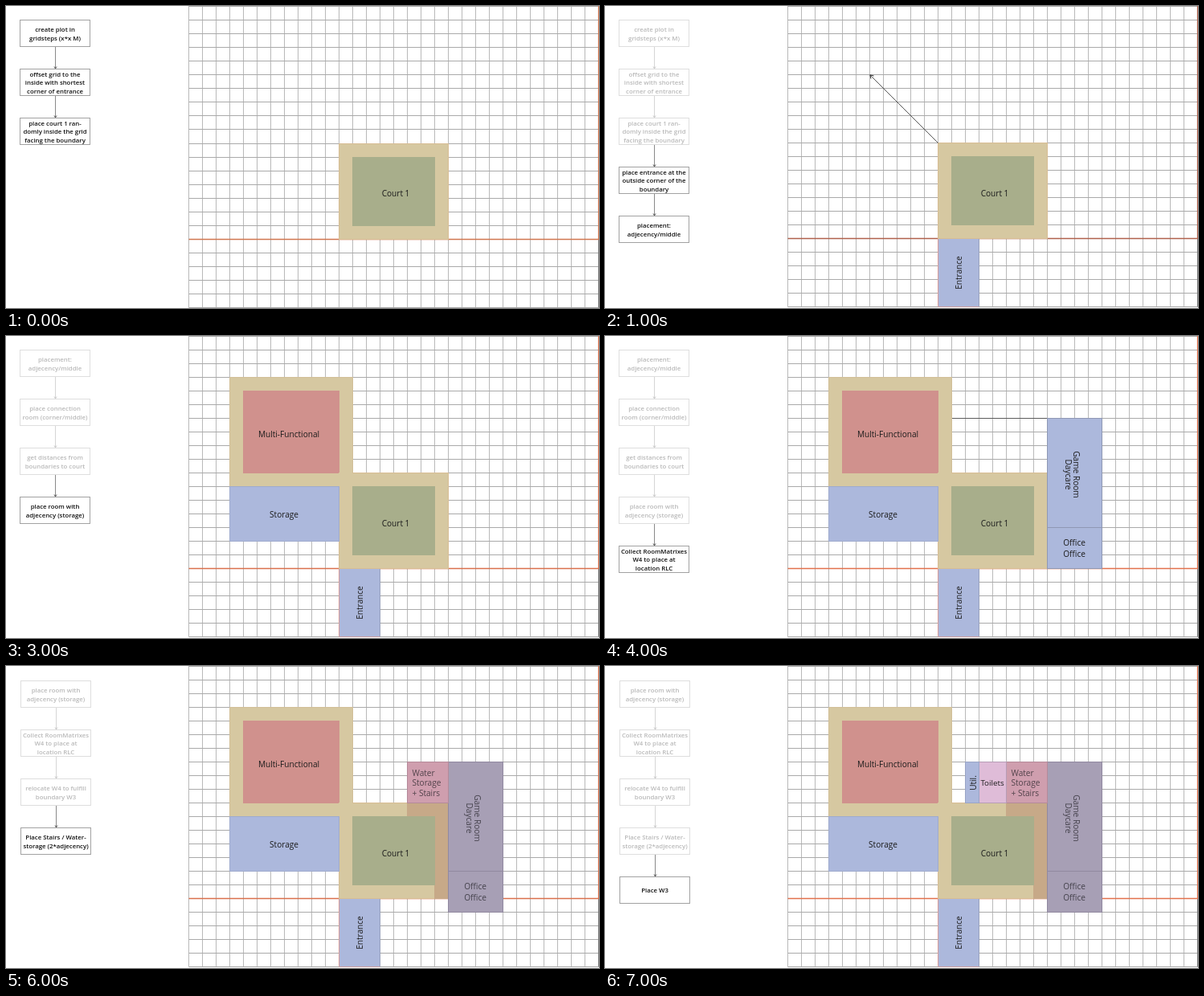
An HTML page for the animation above (8 s loop, 738 by 376 pixels).

```html
<!DOCTYPE html>
<html lang="en">
<head>
<meta charset="utf-8">
<title>Plan layout steps</title>
<style>
html, body { margin: 0; width: 100%; height: 100%; overflow: hidden; background: #fff; }
svg { display: block; font-family: "Open Sans", "Noto Sans", sans-serif; }
text { text-anchor: middle; }
</style>
</head>
<body>
<svg id="stage" width="738" height="376" viewBox="0 0 738 376"></svg>
<script>
const stage = document.getElementById('stage');
const STEP = 1000, COUNT = 8;
const TAN = '#d6c8a1', GREEN = '#a8ae8b', RED = '#d0918d', BLUE = '#acb8dc',
  MAUVE = '#a79fb5', BROWN = '#c7a988', PINK = '#dfbcd8', ROSE = '#cf9eae';

const steps = [
  'create plot in|gridsteps (x*x M)',
  'offset grid to the|inside with shortest|corner of entrance',
  'place court 1 ran-|domly inside the grid|facing the boundary',
  'place entrance at the|outside corner of the|boundary',
  'placement:|adjecency/middle',
  'place connection|room (corner/middle)',
  'get distances from|boundaries to court',
  'place room with|adjecency (storage)',
  'Collect RoomMatrixes|W4 to place at|location RLC',
  'relocate W4 to fulfill|boundary W3',
  'Place Stairs / Water-|storage (2*adjecency)',
  'Place W3'
];

// first and last step listed, first step in full black, plot edge colour
const scenes = [
  { from: 0, to: 2, live: 0, edge: '#d0764f' },
  { from: 0, to: 4, live: 3, edge: '#b0614c' },
  { from: 4, to: 6, live: 5, edge: '#6e6262', side: '#b06a4c' },
  { from: 4, to: 7, live: 7, edge: '#d9704c' },
  { from: 4, to: 8, live: 8, edge: '#e2714c' },
  { from: 7, to: 9, live: 9, edge: '#c4765c' },
  { from: 7, to: 10, live: 10, edge: '#d9704c' },
  { from: 7, to: 11, live: 11, edge: '#e2714c' }
];

let cell = 17;
const X = c => 227.5 + 17 * c;
const Y = r => Math.round(cell * r) + 0.5;

function line(x1, y1, x2, y2, color, w = 1) {
  return `<path d="M${x1} ${y1}L${x2} ${y2}" stroke="${color}" stroke-width="${w}" fill="none"/>`;
}

function room(c1, r1, c2, r2, fill, stroke = fill) {
  return `<rect x="${X(c1)}" y="${Y(r1)}" width="${X(c2) - X(c1)}" height="${Y(r2) - Y(r1)}" fill="${fill}" stroke="${stroke}"/>`;
}

function label(str, x, y, { size = 10.1, color = '#1c1c1c', turn = 0, anchor = 'middle', weight = 400 } = {}) {
  return `<text transform="translate(${x} ${y}) rotate(${turn})" y="${size * 0.36}" font-size="${size}" ` +
    `font-weight="${weight}" fill="${color}" style="text-anchor:${anchor}">${str}</text>`;
}

function flow({ from, to, live }, shift) {
  let out = '';
  for (let i = from; i <= to; i++) {
    const on = i >= live, y = 17.5 + 61 * (i - from);
    const lines = steps[i].split('|');
    out += `<rect x="17.5" y="${y}" width="87" height="33" fill="#fff" stroke="${on ? '#a2a2a2' : '#dedede'}"/>`;
    lines.forEach((s, k) => {
      out += label(s, 61, y + 17 + (k - (lines.length - 1) / 2) * 10.6,
        { size: 7.8, weight: 600, color: on ? '#111' : '#b9b9b9' });
    });
    if (i > from) {
      const ink = on ? '#8a8a8a' : '#d6d6d6', tip = on ? '#444' : '#c4c4c4';
      out += line(61.5, y - 27.5, 61.5, y - 1, ink);
      out += `<path d="M60 ${y - 3}L61.5 ${y - 0.5}L63 ${y - 3}" fill="none" stroke="${tip}" stroke-width=".9"/>`;
    }
  }
  return `<g transform="translate(${shift} ${shift})">${out}</g>`;
}

function grid(edge, side) {
  let out = '';
  for (let c = 0; c <= 30; c++) out += line(X(c), 0, X(c), Y(22), '#b9b9b9');
  for (let r = 0; r <= 22; r++) out += line(X(0), Y(r), X(30), Y(r), '#aaa');
  out += line(X(30), Y(17), X(30), Y(22), '#777');
  out += line(X(0), Y(17), X(30) + 0.5, Y(17), edge, 1.3);
  return out + line(X(30), 0, X(30), Y(17), side, 1.3);
}

function eastWing(top, moved) {
  const fill = moved ? MAUVE : BLUE, color = moved ? '#45424c' : '#1c1c1c';
  const rim = moved ? '#9189a0' : '#8f98b4';
  const y = Y(top);
  return room(19, top, 23, top + 8, fill, rim) + room(19, top + 8, 23, top + 11, fill, rim) +
    label('Game Room', 587, y + 70, { turn: 90, color }) +
    label('Daycare', 577, y + 70, { turn: 90, color }) +
    label('Office', 584, y + 155, { color }) + label('Office', 584, y + 168.5, { color });
}

function draw(n) {
  const s = scenes[n];
  cell = n ? 17 : 17.05;
  let out = '<rect width="738" height="376" fill="#fff"/>';
  out += flow(s, n > 4 ? 1 : 0) + grid(s.edge, s.side || s.edge);

  // measured distances
  const dark = '#5c5c5c';
  if (n === 2) {
    out += line(X(12), Y(3), X(20), Y(3), dark);
    out += line(X(3), Y(11), X(3), Y(21), dark);
  }
  if (n === 4) out += line(X(12), Y(6), X(19), Y(6), dark);
  if (n === 5) out += line(X(12), Y(7), X(19), Y(7), dark) + line(X(14), Y(18), X(19), Y(18), dark);

  if (n >= 1) {
    out += room(11, 17, 14, 22, BLUE, '#98a1bd');
    out += line(X(11), Y(17), X(11), Y(22), '#d99c98') + line(X(11), Y(22), X(14), Y(22), '#c79c9f');
    out += line(X(11), Y(17), X(14), Y(17), s.edge);
    out += label('Entrance', 440, 332, { turn: -90 });
  }
  if (n >= 2) {
    out += room(3, 3, 12, 11, TAN, '#d2bf98') + room(4, 4, 11, 10, RED);
    out += label('Multi-Functional', 352, 122);
  }
  out += room(11, 10, 19, 17, TAN, '#d8bd94');
  if (n >= 2) out += line(X(11), Y(10), X(12) - 0.5, Y(10), TAN) + line(X(11), Y(10), X(11), Y(11), TAN);
  if (n >= 5) out += room(18, 10, 19, 17, BROWN);
  if (n >= 6) out += room(16, 10, 19, 11, BROWN);
  out += room(12, 11, 18, 16, GREEN) + label('Court 1', 485, 233);

  if (n === 1) {
    out += line(X(11), Y(10), 330, 86, '#555') +
      '<path d="M334.5 87L329.8 85.8L331 90.5" fill="none" stroke="#333"/>';
  }
  if (n >= 3) out += room(3, 11, 11, 15, BLUE, '#9fabce') + label('Storage', 346, 222);
  if (n >= 4) out += eastWing(n > 4 ? 7 : 6, n > 4);
  if (n >= 6) {
    out += room(16, 7, 19, 10, ROSE, '#b58a9a');
    ['Water', 'Storage', '+ Stairs'].forEach((t, k) => {
      out += label(t, 505.5, 133 + 12.6 * k, { anchor: 'start', color: '#51424a' });
    });
  }
  if (n >= 7) {
    out += room(14, 7, 16, 10, PINK, '#b79db6') + label('Toilets', 482, 145.5, { size: 9.8 });
    out += room(13, 7, 14, 10, BLUE, '#9aa5c6') + label('Util.', 458, 145.5, { turn: -90 });
  }
  stage.innerHTML = out;
}

let shown = -1;
function tick() {
  const n = Math.floor(performance.now() / STEP) % COUNT;
  if (n !== shown) draw(shown = n);
  requestAnimationFrame(tick);
}
tick();
</script>
</body>
</html>
```
